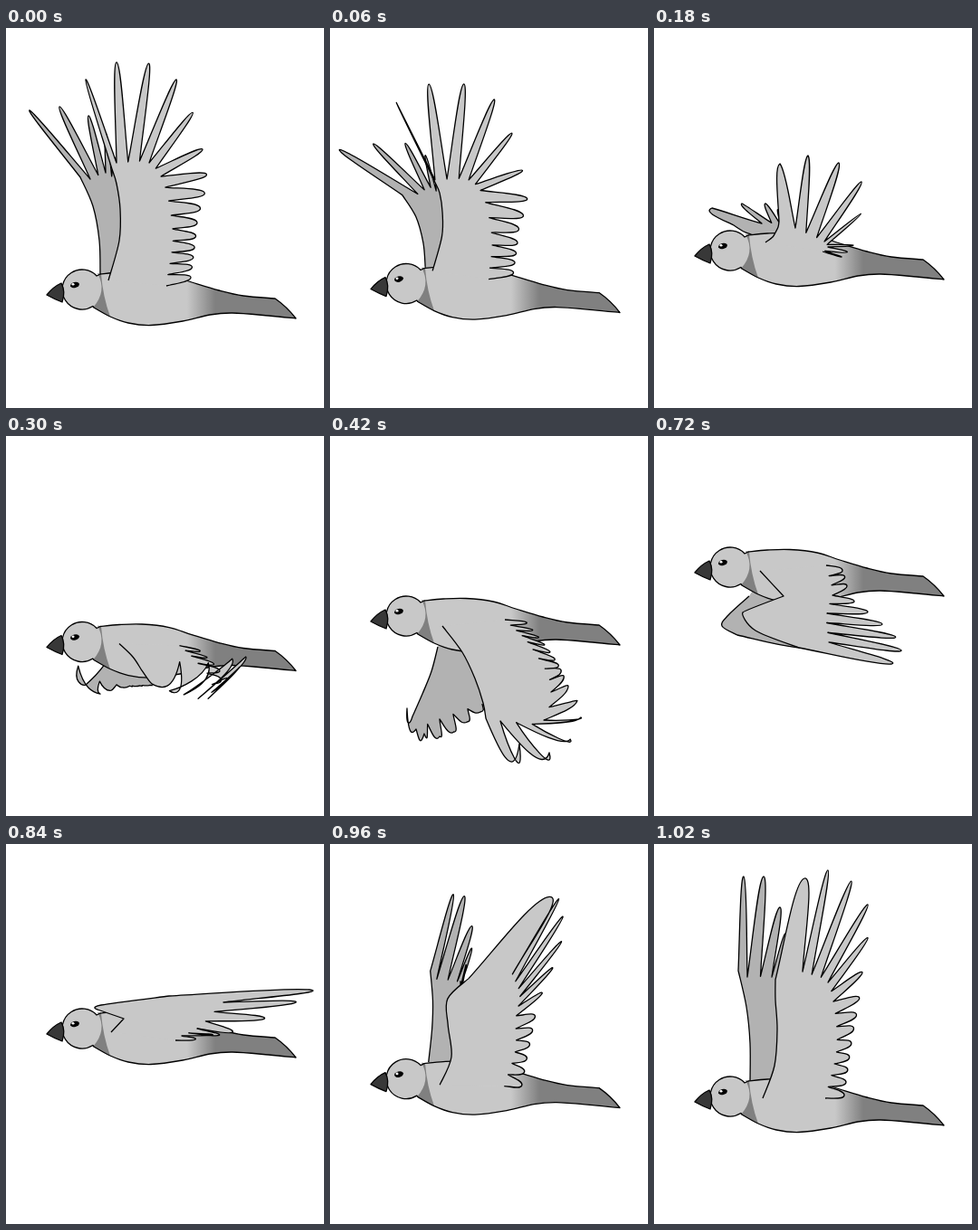
Recreate the animation shown at these times as an HTML page with a canvas. Size 351 px wide and 420 px high, loop 1080 ms.

```html
<!DOCTYPE html>
<html lang="en">
<head>
<meta charset="utf-8">
<title>Flying bird</title>
<style>
html, body { margin: 0; width: 100%; height: 100%; overflow: hidden; background: #fff; }
canvas { display: block; }
</style>
</head>
<body>
<canvas id="stage" width="351" height="420"></canvas>
<script>
const ctx = document.getElementById('stage').getContext('2d');
const STEP = 60, COUNT = 18;
const LIGHT = '#c8c8c8', SHADE = '#b2b2b2', DARK = '#808080', INK = '#000';

// A wing is a leading edge plus two guide lines, one for tips and one for notches.
// These are the feather numbers at which the guide points stand.
const NEAR = { lead: 5, tips: [0, 1, 3, 5, 9, 14], notches: [0, 3, 5, 9, 14] };
const FAR = { lead: 4, tips: [0, 1, 2, 5], notches: [0, 2, 5] };

const poses = [];
function pose(at, lift, curl, feathers, near, far) {
  poses.push({ at, v: [lift, curl, feathers, ...near.flat(), ...far.flat()] });
}

pose(0, 0, 0, 15, [
  [113,279, 125,235, 126,200, 122,172, 117,156],
  [88,57, 122,38, 188,57, 217,134, 211,215, 204,276],
  [122,149, 158,149, 171,164, 184,222, 177,285]
], [
  [104,273, 103,235, 96,197, 82,165],
  [26,91, 59,87, 91,97, 130,170],
  [93,167, 110,160, 128,180]
]);
pose(3, -43, 6, 8, [
  [123,237, 131,231, 134,226, 137,220, 138,214],
  [139,150, 170,141, 229,170, 220,240, 214,247, 207,253],
  [156,221, 188,236, 192,242, 189,246, 186,247]
], [
  [112,229, 107,228, 99,225, 88,218],
  [64,199, 97,194, 123,194, 146,225],
  [119,216, 139,216, 146,235]
]);
pose(7, -90, 48, 15, [
  [124,210, 146,239, 160,268, 169,295, 172,312],
  [209,340, 242,350, 277,311, 263,277, 248,246, 217,206],
  [188,315, 236,314, 244,283, 224,236, 193,203]
], [
  [119,233, 112,260, 102,285, 91,310],
  [85,301, 104,329, 121,332, 166,305],
  [95,324, 121,313, 168,296]
]);
pose(9, -148, 0, 15, [
  [121,148, 141,182, 150,215, 151,250, 148,285],
  [137,379, 171,393, 234,364, 252,284, 233,205, 208,144],
  [159,281, 190,278, 203,258, 207,200, 187,139]
], [
  [108,170, 117,210, 115,247, 105,280],
  [77,345, 109,342, 139,326, 158,280],
  [126,269, 148,272, 155,275]
]);
pose(12, -144, 0, 9, [
  [117,149, 143,177, 98,195, 112,215, 160,234],
  [262,252, 273,237, 252,208, 221,183, 213,162, 208,148],
  [193,228, 191,196, 197,176, 195,162, 190,143]
], [
  [105,177, 82,198, 75,210, 92,220],
  [160,234, 168,227, 170,225, 180,220],
  [165,228, 172,225, 180,220]
]);
pose(14, -85, 0, 7, [
  [116,208, 130,193, 101,183, 105,178, 180,168],
  [335,161, 320,175, 250,208, 228,211, 218,214, 209,216],
  [240,175, 211,204, 194,212, 192,214, 187,217]
], [
  [112,187, 118,184, 125,183, 135,182],
  [150,190, 150,190, 150,190, 150,190],
  [150,190, 150,190, 150,190]
]);
pose(17, -10, 0, 14, [
  [120,281, 133,245, 136,205, 134,172, 134,150],
  [166,38, 192,29, 236,67, 230,142, 219,213, 210,278],
  [164,141, 192,153, 198,174, 202,224, 189,281]
], [
  [106,264, 106,220, 102,180, 93,140],
  [99,36, 121,36, 139,70, 140,150],
  [103,147, 130,147, 140,170]
]);

// Smooth curve through vectors vs standing at xs, read at x
function spline(xs, vs, x) {
  const last = xs.length - 1;
  let i = 0;
  while (i < last - 1 && xs[i + 1] <= x) i++;
  const h = xs[i + 1] - xs[i], u = (x - xs[i]) / h;
  return vs[i].map((a, k) => {
    const b = vs[i + 1][k];
    const slope = j => (vs[j + 1][k] - vs[j][k]) / (xs[j + 1] - xs[j]);
    const tangent = j => {
      if (j === 0) return slope(0);
      if (j === last) return slope(last - 1);
      const l = xs[j] - xs[j - 1], r = xs[j + 1] - xs[j];
      return (slope(j - 1) * r + slope(j) * l) / (l + r);
    };
    return a + (b - a) * u * u * (3 - 2 * u)
      + h * u * (1 - u) * (tangent(i) * (1 - u) - tangent(i + 1) * u);
  });
}

// The poses with their neighbours from the loops before and after
const shift = (list, by) => list.map(p => ({ at: p.at + by, v: p.v }));
const track = [...shift(poses.slice(-2), -COUNT), ...poses, ...shift(poses.slice(0, 2), COUNT)];
const times = track.map(p => p.at), values = track.map(p => p.v);

const pairs = list => {
  const out = [];
  for (let i = 0; i + 1 < list.length; i += 2) out.push([list[i], list[i + 1]]);
  return out;
};

// Rounded line that goes on from the first point; sharp turns stay corners
function curve(path, pts) {
  const pull = pts.map((p, i) => {
    const a = pts[i - 1] || p, b = pts[i + 1] || p;
    const dot = (p[0] - a[0]) * (b[0] - p[0]) + (p[1] - a[1]) * (b[1] - p[1]);
    const cos = dot / (Math.hypot(p[0] - a[0], p[1] - a[1]) * Math.hypot(b[0] - p[0], b[1] - p[1]) || 1);
    const soft = Math.max(0, Math.min(1, 1 + 3 * cos)) / 6;
    return [(b[0] - a[0]) * soft, (b[1] - a[1]) * soft];
  });
  for (let i = 0; i < pts.length - 1; i++) {
    const a = pts[i], b = pts[i + 1], p = pull[i], q = pull[i + 1];
    path.bezierCurveTo(a[0] + p[0], a[1] + p[1], b[0] - q[0], b[1] - q[1], ...b);
  }
}

function feather(path, from, tip, to, droop) {
  const mid = [(from[0] + to[0]) / 2, (from[1] + to[1]) / 2];
  const at = (side, along, bend) => [0, 1].map(d =>
    mid[d] + (tip[d] - mid[d]) * along + (side[d] - mid[d]) * .75 + d * droop * bend);
  path.bezierCurveTo(...at(from, .35, .4), ...at(from, 1, 1), ...tip);
  path.bezierCurveTo(...at(to, 1, 1), ...at(to, .35, .4), ...to);
}

function wing(shape, pts, count, curl) {
  const path = new Path2D();
  const lead = pts.slice(0, shape.lead);
  const tips = pts.slice(shape.lead, shape.lead + shape.tips.length);
  const notches = pts.slice(shape.lead + shape.tips.length);
  path.moveTo(...lead[0]);
  curve(path, lead);
  let from = lead[lead.length - 1];
  for (let i = 0; i < count; i++) {
    // The first six are long; the others share the rest of the guide line
    const u = i < 6 ? i : 5 + 9 * (i - 5) / (count - 6);
    const to = spline(shape.notches, notches, u);
    feather(path, from, spline(shape.tips, tips, u), to, curl / (1 + i * i));
    from = to;
  }
  return path;
}

function paint(path, fill, line = path) {
  ctx.fillStyle = fill;
  ctx.fill(path);
  ctx.stroke(line);
}

const bodyPath = new Path2D('M104 272');
curve(bodyPath, pairs([104,272, 125,270, 150,269.5, 180,273, 205,281, 235,290, 262,296, 297,299]));
bodyPath.quadraticCurveTo(310, 308, 320, 321);
curve(bodyPath, pairs([320,321, 290,318, 250,315, 225,317, 195,324, 160,328.5, 135,326, 115,319, 97,309]));
bodyPath.arc(84, 289, 22, 1, Math.PI * 2 - .75);
bodyPath.closePath();

const collar = new Path2D('M101 271 Q112 291 96 309 L115 319 Q107 297 105 272 Z');
const beak = new Path2D('M45 295 Q52 286 61 282 Q66 291 62 303 Q54 300 45 295 Z');

const plumage = ctx.createLinearGradient(200, 0, 231, 0);
plumage.addColorStop(0, LIGHT);
plumage.addColorStop(1, DARK);

function ellipse(x, y, rx, ry, turn, fill) {
  ctx.fillStyle = fill;
  ctx.beginPath();
  ctx.ellipse(x, y, rx, ry, turn, 0, Math.PI * 2);
  ctx.fill();
}

function body(y) {
  ctx.save();
  ctx.translate(0, y);
  ctx.fillStyle = plumage;
  ctx.fill(bodyPath);
  ctx.fillStyle = DARK;
  ctx.fill(collar);
  ctx.stroke(bodyPath);
  paint(beak, '#383838');
  ellipse(76, 284, 5, 3.2, -.25, INK);
  ellipse(74, 283.3, 1.5, 1.3, 0, '#fff');
  ctx.restore();
}

function draw(frame) {
  ctx.fillStyle = '#fff';
  ctx.fillRect(0, 0, 351, 420);
  ctx.strokeStyle = INK;
  ctx.lineWidth = 1.3;
  ctx.lineJoin = 'round';

  const [lift, curl, feathers, ...rest] = spline(times, values, frame);
  const pts = pairs(rest);
  const split = NEAR.lead + NEAR.tips.length + NEAR.notches.length;
  const near = pts.slice(0, split);

  const farLine = wing(FAR, pts.slice(split), 6, curl * .6);
  const farFill = new Path2D(farLine);
  // Carry the fill on beneath the near wing
  near.slice(0, NEAR.lead - 1).reverse().forEach(([x, y]) => farFill.lineTo(x + 6, y));
  paint(farFill, SHADE, farLine);

  body(lift);
  paint(wing(NEAR, near, Math.max(7, Math.round(feathers)), curl), LIGHT);
}

const start = performance.now();
function tick() {
  draw(Math.floor((performance.now() - start) / STEP) % COUNT);
  requestAnimationFrame(tick);
}
tick();
</script>
</body>
</html>
```
